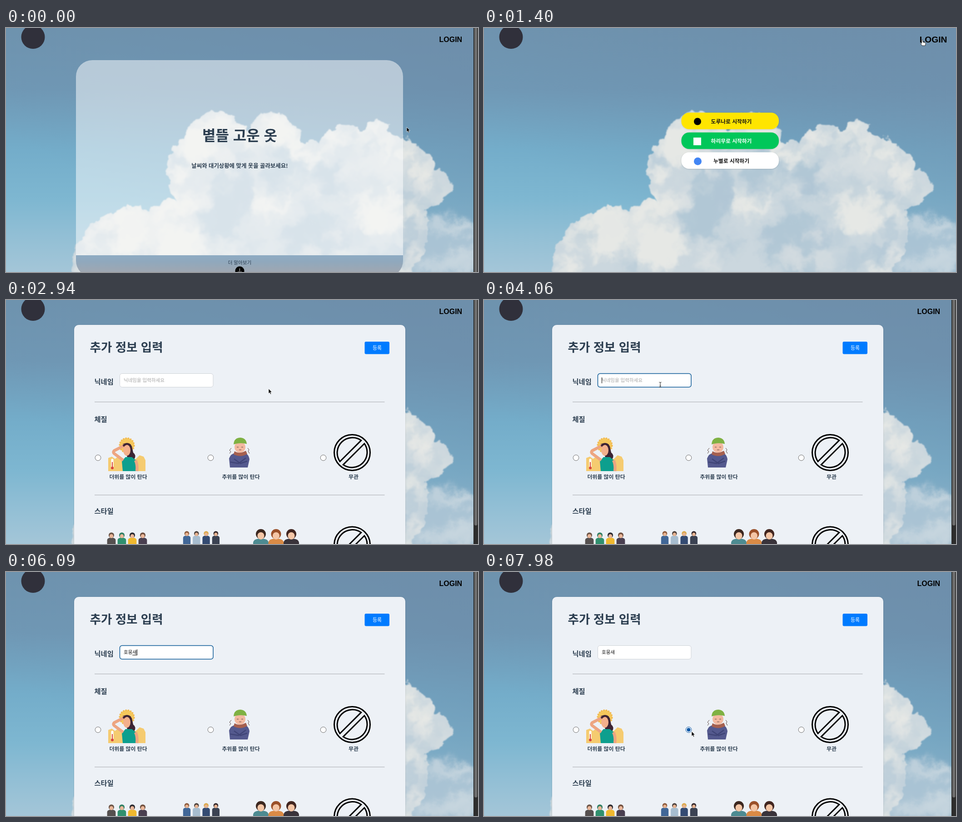
These frames come from a looping animation (1039 by 539 pixels, 8000 ms). An HTML page:

```html
<!DOCTYPE html>
<html lang="ko">
<head>
<meta charset="utf-8">
<style>
html, body { margin: 0; width: 100%; height: 100%; overflow: hidden; background: #7198b4; }
svg { position: absolute; left: 0; top: 0; width: 100%; height: 100%; }
#sky { will-change: transform; }
text { font-family: "Noto Sans CJK KR", "Noto Sans CJK", sans-serif; fill: #2c3e50; }
.b { font-weight: 600; }
.m { text-anchor: middle; }
#login { font: bold 16px "Liberation Sans", Arial, sans-serif; fill: #000; }
</style>
</head>
<body>
<svg id="sky" viewBox="0 0 1039 539">
  <defs>
    <linearGradient id="air" x2="0" y2="1">
      <stop stop-color="#6f95b0"/><stop offset=".25" stop-color="#7099b6"/>
      <stop offset=".5" stop-color="#74adca"/><stop offset=".7" stop-color="#7eb7d1"/>
      <stop offset=".85" stop-color="#92bfd5"/><stop offset="1" stop-color="#a4c6d8"/>
    </linearGradient>
    <linearGradient id="dusk" x1=".35" y1=".8" x2="1" y2=".2">
      <stop stop-color="#6d8ba8" stop-opacity="0"/><stop offset="1" stop-color="#6d8ba8" stop-opacity=".6"/>
    </linearGradient>
    <filter id="puff" x="-10%" y="-10%" width="120%" height="120%" color-interpolation-filters="sRGB">
      <feTurbulence type="fractalNoise" baseFrequency=".045" numOctaves="4" seed="4"/>
      <feDisplacementMap in="SourceGraphic" scale="22" xChannelSelector="R" yChannelSelector="G"/>
      <feGaussianBlur stdDeviation="1.3"/>
    </filter>
    <filter id="soft" x="-20%" y="-20%" width="140%" height="140%" color-interpolation-filters="sRGB">
      <feGaussianBlur in="SourceGraphic" stdDeviation="9" result="s"/>
      <feTurbulence type="fractalNoise" baseFrequency=".035" numOctaves="4" seed="9"/>
      <feDisplacementMap in="s" scale="45" xChannelSelector="R" yChannelSelector="G"/>
    </filter>
    <clipPath id="edge"><path id="edgePath"/></clipPath>
  </defs>
  <rect width="1039" height="539" fill="url(#air)"/>
  <rect width="1039" height="539" fill="url(#dusk)"/>
  <g id="haze" filter="url(#soft)"></g>
  <g filter="url(#puff)">
    <path id="cloud" fill="#cbd7de"/>
    <g clip-path="url(#edge)"><g id="tones" filter="url(#soft)"></g></g>
  </g>
</svg>

<svg viewBox="0 0 1039 539">
  <defs>
    <linearGradient id="strip" x2="0" y2="1">
      <stop stop-color="#8eabc3"/><stop offset=".3" stop-color="#90a8bd"/><stop offset=".8" stop-color="#a0a7b0"/>
    </linearGradient>
    <filter id="shade" x="-10%" y="-10%" width="120%" height="130%">
      <feDropShadow dx="0" dy=".5" stdDeviation="1" flood-opacity=".18"/>
    </filter>
    <g id="none" fill="none" stroke="#000" stroke-width="3">
      <circle r="39.5"/>
      <path id="half" d="M-33-5A33.5 33.5 0 0 1 33-5Z" transform="rotate(-45)"/>
      <use href="#half" transform="rotate(180)"/>
    </g>
  </defs>

  <g id="home">
    <path d="M154 502V107a36 36 0 0 1 36-36h648a36 36 0 0 1 36 36v395z" fill="#fff" opacity=".5"/>
    <path d="M154 502h720v12a36 36 0 0 1-36 36H190a36 36 0 0 1-36-36z" fill="url(#strip)"/>
    <text class="b m" x="514.5" y="249" font-size="32">볕뜰 고운 옷</text>
    <text class="b m" x="514.5" y="308.5" font-size="12.4">날씨와 대기상황에 맞게 옷을 골라보세요!</text>
    <text class="m" x="514.5" y="521.5" font-size="10.6">더 알아보기</text>
    <circle cx="514.5" cy="536.5" r="10"/>
    <path d="M514.5 531v10m-4-4l4 4 4-4" fill="none" stroke="#ddd"/>
  </g>

  <g id="start" font-size="11.75">
    <g id="buttons" filter="url(#shade)"></g>
    <circle cx="470" cy="206.5" r="8"/>
    <rect x="461" y="242" width="17" height="17" fill="#fff"/>
    <circle cx="470.5" cy="294.5" r="8.5" fill="#4285f4"/>
  </g>

  <g id="form">
    <rect x="150" y="55" width="729" height="520" rx="10" fill="#edf1f6" filter="url(#shade)"/>
    <text class="b" x="184.5" y="114" font-size="26.5">추가 정보 입력</text>
    <rect x="789.5" y="92" width="54.5" height="27.5" rx="3" fill="#007bff"/>
    <text class="m" x="817" y="109.5" font-size="10.9" style="fill:#fff">등록</text>
    <g class="b" font-size="15.3">
      <text x="194.5" y="186">닉네임</text>
      <text x="194.5" y="268.5">체질</text>
      <text x="194.5" y="472">스타일</text>
    </g>
    <rect id="field" x="250.5" y="162.5" width="205.5" height="30" rx="5" fill="#fff"/>
    <text id="nick" x="259" y="181" font-size="10.5"></text>
    <rect id="under" y="183" width="9.7" height="1"/>
    <rect id="caret" y="171" width="1" height="13"/>
    <path d="M195 225.2H833.5M195 430.8H833.5" stroke="#a5a9ad"/>
    <g id="choices" class="m b" font-size="11.9"></g>
    <circle id="dot" cx="450.5" cy="348.5" r="4.1" fill="#0a57a6"/>
    <use href="#none" transform="translate(762 337)"/>
    <use href="#none" transform="translate(762 540.5)"/>

    <!-- hot -->
    <g transform="translate(266 340)">
      <circle cy="-19" r="16" fill="#f5c75c" stroke="#f2b84f" stroke-width="3" stroke-dasharray="3 2.5"/>
      <path d="M-41 38V9l8-3 7 5 8-6 12 6H20l8-8 9 3 4 8v24z" fill="#f5cb70"/>
      <path d="M-9-22q14-5 20 5l3 14q8 6 2 15L2 10z" fill="#3d2433"/>
      <path d="M-9 38l-2-22 8-9H11l9 7 2 24z" fill="#0d9f8e"/>
      <ellipse cy="-8" rx="8" ry="12" fill="#f3b08c"/>
      <path d="M-8 14l-20-15q-3-3 0-6l23-12M19 14q5 10 3 24" fill="none" stroke="#eda581" stroke-width="6.5"/>
      <path d="M-8-17q8-9 16-2" fill="none" stroke="#3d2433" stroke-width="4"/>
      <path d="M-32 13v17" stroke="#fff" stroke-width="5" stroke-linecap="round"/>
      <path d="M-32 18v13" stroke="#d8453b" stroke-width="2"/>
      <circle cx="-32" cy="31" r="3" fill="#d8453b"/>
    </g>

    <!-- cold -->
    <g transform="translate(514 340)">
      <path d="M-21 30l-2-20Q-19-1-9-2H10Q20-1 22 12L18 30z" fill="#54598e"/>
      <path d="M-20 18l18 3 16-12M17 16L2 21-12 11" fill="none" stroke="#3f4476" stroke-width="2.5"/>
      <circle cx="1" cy="-15" r="12" fill="#f3b9a0"/>
      <path d="M-11-6Q0 1 14-7L17 0Q3 9-13 1z" fill="#a6604f"/>
      <path d="M-13-21Q-12-36 2-36 15-35 16-22 2-26-13-21z" fill="#7fb143"/>
      <path d="M-6-15h4m6 0h4m-9 6h5M-18-13l-4 5 3 3-3 4M18-13l3 4-2 3 3 5" fill="none" stroke="#5b4540"/>
    </g>

    <g id="casual"></g>
    <g id="office"></g>
    <g id="sporty"></g>
  </g>

  <circle cx="59.5" cy="20" r="26" fill="#30303b"/>
  <g id="loginBox"><text id="login" class="m" y="5.7">LOGIN</text></g>
  <g id="bar">
    <rect x="1029" width="10" height="539" fill="#2d2d2d"/>
    <rect id="thumb" x="1031" y="-5" width="6.5" rx="3" fill="#6e6e6e"/>
  </g>

  <g id="mouse">
    <path id="arrow" d="M0 0V10.5L2.4 8.4 4.1 12.2 5.9 11.4 4.2 7.7H7.4Z" stroke="#fff" stroke-width=".7"/>
    <path id="hand" d="M-1.6 1q1.6-1.8 2.6 0V5l5 1.2q1.5.5 1.2 2.5L6.2 13H-.5L-4 8.3q.2-1.8 2.4-.2z" fill="#fff" stroke="#222" stroke-width=".9"/>
    <path id="beam" d="M-2.5-5.5Q0-5.5 0-4 0-5.5 2.5-5.5M0-4V4M-2.5 5.5Q0 5.5 0 4 0 5.5 2.5 5.5M-1.3 2H1.3" fill="none" stroke="#222"/>
  </g>
</svg>

<script>
const $ = id => document.getElementById(id);
const set = (id, attrs) => { for (const k in attrs) $(id).setAttribute(k, attrs[k]); };
const show = (id, on) => $(id).style.display = on ? '' : 'none';
function add(parent, tag, attrs, text = '') {
  const el = document.createElementNS('http://www.w3.org/2000/svg', tag);
  for (const k in attrs) el.setAttribute(k, attrs[k]);
  el.textContent = text;
  $(parent).append(el);
}
let seed = 7;
const rnd = () => (seed = seed * 16807 % 2147483647) / 2147483647;

// Cloud: bulging arcs through key points, bright along the rim, random puffs inside
const rim = [[150,548],[170,472],[242,406],[320,406],[348,382],[386,386],[361,306],[395,244],[438,196],
  [466,186],[515,208],[537,226],[583,186],[643,218],[655,252],[693,260],[733,219],[793,228],[822,200],
  [853,238],[908,259],[948,309],[988,350],[930,400],[890,548]];
const outline = 'M' + rim.map(([x, y], i) => {
  const [px, py] = rim[Math.max(0, i - 1)], r = Math.hypot(x - px, y - py) * 1.05;
  return i ? `A${r} ${r} 0 0 1 ${x} ${y}` : `${x} ${y}`;
}).join('') + 'Z';
set('cloud', { d: outline });
set('edgePath', { d: outline });

const light = '#e6e8e5', dim = '#b1c7d5';
const puff = (cx, cy, r, fill, opacity = 1) => add('tones', 'circle', { cx, cy, r, fill, opacity });
for (const [x, y, r] of [[620,320,45],[720,335,45],[500,360,55],[690,480,75],[480,430,40]]) puff(x, y, r, dim);
for (const [x, y, r] of [[265,450,60],[385,480,55],[585,390,32],[825,400,55],[430,255,45],[600,220,40]]) puff(x, y, r, light);
for (const [x, y] of rim) puff(x + (620 - x) * .08, y + (420 - y) * .12, 24, light);
for (let i = 0; i < 110; i++) puff(180 + 780 * rnd(), 220 + 320 * rnd(), 7 + 20 * rnd(), rnd() < .5 ? light : dim, .55);
add('haze', 'ellipse', { cx: 960, cy: 490, rx: 110, ry: 75, fill: '#b3c9d7', opacity: .75 });
for (let i = 0; i < 12; i++) {
  add('haze', 'ellipse', { cx: 900 + 140 * rnd(), cy: 400 + 140 * rnd(), rx: 35, ry: 10, fill: '#c6d5de' });
}

['도루나 #ffe500 #111', '하리무 #03c75a #fff', '누별 #fff #111'].forEach((row, i) => {
  const [name, fill, ink] = row.split(' '), y = 187 + 43.75 * i;
  add('buttons', 'rect', { x: 434.5, y, width: 214.5, height: 36.5, rx: 17, fill });
  add('start', 'text', { class: 'b m', x: 544.5, y: y + 23.5, style: 'fill:' + ink }, name + '로 시작하기');
});

['더위를 많이 탄다', '추위를 많이 탄다', '무관'].forEach((label, i) => {
  const x = 202.5 + 248 * i;
  add('choices', 'circle', { id: 'radio' + i, cx: x, cy: 348.5, r: 6.3, fill: '#fff', stroke: '#6f6f6f' });
  add('choices', 'text', { x: x + 66.5, y: 395 }, label);
});

function crowd(id, x0, step, y, r, skin, hairs, tops) {
  hairs.split(' ').forEach((hair, i) => {
    const x = x0 + step * i, w = r * 1.7;
    add(id, 'path', { d: `M${x - w} 545V${y + r * 3}q0-${r} ${w}-${r}t${w} ${r}V545z`, fill: tops.split(' ')[i] });
    add(id, 'circle', { cx: x, cy: y + r, r: r * 1.1, fill: hair });
    add(id, 'ellipse', { cx: x, cy: y + r * 1.4, rx: r * .75, ry: r * .8, fill: skin });
  });
}
crowd('casual', 232, 23, 514, 5.5, '#ebb799', '#6d5648 #2f8064 #2b2a30 #70503f', '#55504f #30906e #efb82f #493f50');
crowd('office', 398, 21.3, 511, 4.8, '#e8b492', '#8c5a3c #4c413d #dba94c #33272a', '#416797 #a7bdcf #344b72 #3b4252');
crowd('sporty', 561, 33.5, 507, 10, '#f4c6a6', '#3c271f #9a5029 #41251f', '#4d8b91 #d98a45 #39333a');

// Pointer: time, x, y
const route = [[140,882,219],[840,965,26],[1400,965,26],[1820,617,174],[2030,506,252],[2310,578,196],
  [3220,578,196],[3710,388,192],[3850,388,192],[4060,388,187],[6580,391,187],[7350,476,350],[7700,457,352]];
const stages = ['ㅎ', '호', '호ㅁ', '호무', '호뭉', '호뭉ㅅ', '호뭉새'];
const strokes = [5040, 5320, 5670, 5810, 5880, 6020, 6090];

const ramp = (t, a, b) => Math.min(1, Math.max(0, (t - a) / (b - a)));
function pointer(t) {
  const i = Math.max(1, route.findIndex(p => p[0] > t));
  const [a, b] = t >= 7700 ? route.slice(-2) : [route[i - 1], route[i]], k = ramp(t, a[0], b[0]);
  return [a[1] + (b[1] - a[1]) * k, a[2] + (b[2] - a[2]) * k];
}

function draw(t) {
  const home = t < 1050, form = t >= 2940, start = !home && !form;
  show('home', home); show('start', start); show('form', form); show('bar', !start);
  $('sky').style.transform = start ? '' : 'translateX(-.48vw)';
  set('thumb', { height: home ? 550 : 503 });

  const zoom = 1 + .2 * (ramp(t, 700, 840) - ramp(t, 1400, 1610));
  set('loginBox', { transform: `translate(${start ? 989 : 978.8} 25.5) scale(${zoom})` });

  const [x, y] = pointer(t);
  const onButton = x > 434 && x < 649 && y > 187 && y < 311 && (y - 187) % 43.75 < 36.5;
  const hand = t >= 770 && t < 1470 || start && t < 2730 && onButton;
  const beam = form && x > 250 && x < 456 && y > 162 && y < 193;
  set('mouse', { transform: `translate(${x} ${y})` });
  show('mouse', t < 5040 || t >= 6650);
  show('hand', hand); show('beam', beam); show('arrow', !hand && !beam);

  const focus = t >= 3920 && t < 7840;
  const typed = stages[strokes.filter(s => s <= t).length - 1] || '';
  set('field', { stroke: focus ? '#0c5a96' : '#cfd3d8', 'stroke-width': focus ? 1.5 : 1 });
  $('nick').textContent = typed || '닉네임을 입력하세요';
  $('nick').style.fill = typed ? '#111' : '#a6a6a6';
  const end = 259 + typed.length * 9.66;
  set('caret', { x: end });
  set('under', { x: end - 9.7 });
  // The caret blinks, restarting from the last key press
  const blink = t - (t < 5040 ? 3920 : 6090);
  show('caret', focus && Math.floor(blink / 540) % 2 != 1);
  show('under', focus && typed);

  const picked = t >= 7910;
  set('radio1', { stroke: picked ? '#0a57a6' : '#6f6f6f' });
  show('dot', picked);
}

const t0 = performance.now();
function tick() {
  const t = (performance.now() - t0) % 8000;
  draw(Math.floor(t / 70) * 70);
  requestAnimationFrame(tick);
}
tick();
</script>
</body>
</html>
```
